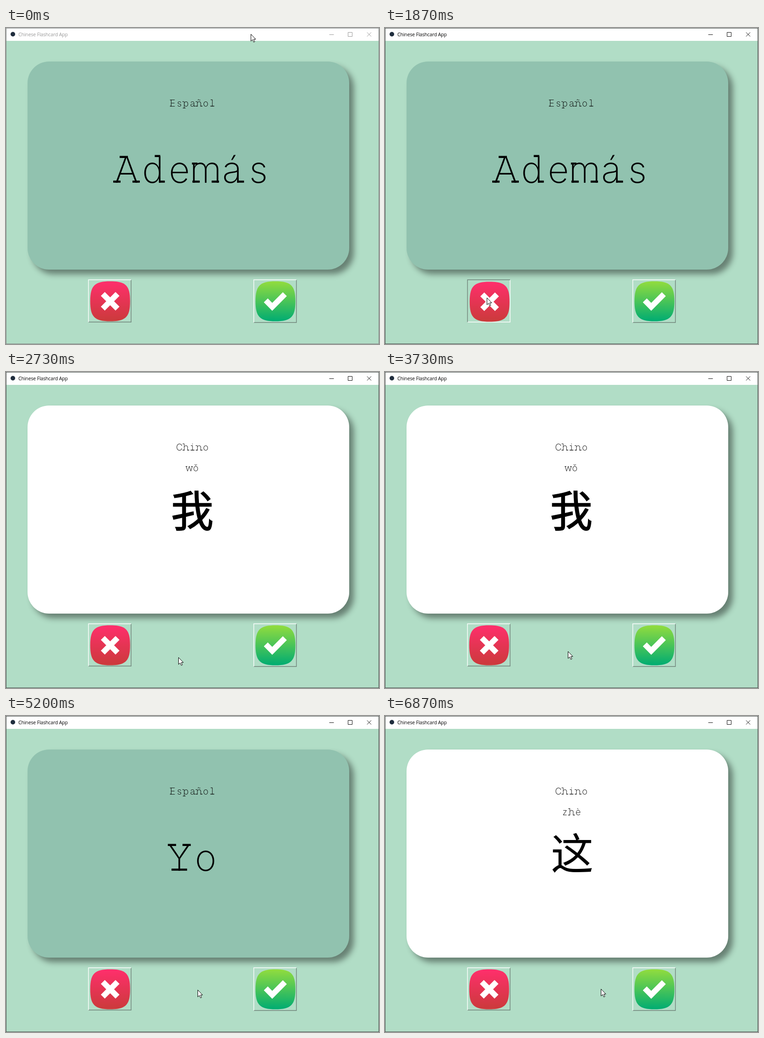
Animation, 814 px wide and 688 px high, one loop 8 s. Source, as an HTML page:

```html
<!DOCTYPE html>
<html lang="es">
<head>
<meta charset="utf-8">
<title>Chinese Flashcard App</title>
<style>
html, body { margin: 0; width: 100%; height: 100%; overflow: hidden; background: #b1ddc6; }
svg { position: absolute; left: 0; top: 0; display: block; }
#card {
  position: absolute; left: 47px; top: 73px; width: 702px; height: 453px;
  border-radius: 47px; box-shadow: 10px 10px 13px rgba(0, 0, 0, .42);
}
.title { font: 10.5px "Open Sans", "Noto Sans", sans-serif; letter-spacing: -.13px; }
.word text {
  font: 200 80px Inter, "Open Sans", sans-serif;
  font-optical-sizing: none; text-anchor: middle;
}
.word path { fill: none; stroke: #000; stroke-width: 4.4; }
.hanzi { font: 93px "Noto Sans CJK SC", "Noto Sans CJK", sans-serif; text-anchor: middle; }
.mark { fill: none; stroke: #fff; stroke-width: 12.2; }
</style>
</head>
<body>
<div id="card"></div>
<svg id="stage" width="814" height="688" viewBox="0 0 814 688">
  <defs>
    <linearGradient id="red" x2="0" y2="1"><stop stop-color="#ff2f6c"/><stop offset="1" stop-color="#cb3a3b"/></linearGradient>
    <linearGradient id="green" x2="0" y2="1"><stop stop-color="#92dc3e"/><stop offset="1" stop-color="#00ac72"/></linearGradient>
  </defs>
  <rect width="814" height="28" fill="#fff"/>
  <circle cx="15" cy="13.5" r="5" fill="#1f2d3d"/>
  <text id="title" class="title" x="27" y="18">Chinese Flashcard App</text>
  <path id="controls" fill="none" d="M705.5 14.5h10M746.5 9.5h9v9h-9zM788 9.5l9 9M797 9.5l-9 9"/>
  <rect id="frame" x=".5" y=".5" width="813" height="687" fill="none"/>
  <g id="faces"></g>
  <g id="buttons"></g>
  <path id="cursor" fill="#fff" stroke="#000" stroke-linejoin="round"
    d="M.5.5V15.6L4 12.4 6.5 17.8 8.9 16.7 6.5 11.4H11z"/>
</svg>
<script>
const LOOP = 8000;
const CELL = 57.6;
const $ = id => document.getElementById(id);

function add(parent, tag, attrs, text = '') {
  const el = document.createElementNS('http://www.w3.org/2000/svg', tag);
  for (const key in attrs) el.setAttribute(key, attrs[key]);
  el.textContent = text;
  return parent.appendChild(el);
}

// Slab serifs: letters sharing a bar, its height, its length, its centres in the cell.
const BASE = -2.2, MID = -41.6, CAP = -56, TALL = -58;
const slabs = [
  ['Ahmn', BASE, 16, [-21, 21]],
  ['ad', BASE, 12, [20]],
  ['Yil', BASE, 34, [0]],
  ['E', BASE, 12, [-18]],
  ['E', CAP, 12, [-18]],
  ['A', CAP, 18, [-6]],
  ['Y', CAP, 18, [-16, 16]],
  ['mnp', MID, 12, [-24]],
  ['w', MID, 14, [-23, 23]],
  ['i', MID, 14, [-7]],
  ['l', TALL, 14, [-7]],
  ['d', TALL, 12, [10]],
  ['h', TALL, 12, [-22]],
  ['p', 14, 24, [-15]]
];

function slabPath(ch) {
  const letter = ch.normalize('NFD')[0];
  return slabs.filter(([letters]) => letters.includes(letter))
    .flatMap(([, y, len, xs]) => xs.map(x => `M${x - len / 2} ${y}h${len}`)).join('');
}

function word(parent, text, y, scale) {
  const g = add(parent, 'g', { class: 'word', transform: `translate(407 ${y}) scale(${scale})` });
  const xs = [...text].map((_, i) => (i - (text.length - 1) / 2) * CELL);
  add(g, 'text', { x: xs.join(' ') }, text);
  [...text].forEach((ch, i) => add(g, 'path', { d: slabPath(ch), transform: `translate(${xs[i]})` }));
}

function spanish(text) {
  const g = add($('faces'), 'g', {});
  word(g, 'Español', 170.7, .25);
  word(g, text, 336.7, 1);
  return g;
}

function chinese(pinyin, hanzi, x, y, weight) {
  const g = add($('faces'), 'g', {});
  word(g, 'Chino', 170.7, .25);
  word(g, pinyin, 216.2, .25);
  add(g, 'text', { class: 'hanzi', lang: 'zh-Hans', x, y, stroke: '#000', 'stroke-width': weight }, hanzi);
  return g;
}

function button(x, h, fill, mark) {
  const g = add($('buttons'), 'g', { transform: `translate(${x} 548.2)`, fill: 'none', 'stroke-width': 1.4 });
  const low = add(g, 'path', { d: `M0 ${h}H93V0` });
  const high = add(g, 'path', { d: `M0 ${h}V0H93` });
  const icon = add(g, 'g', { stroke: 'none' });
  add(icon, 'path', {
    fill: `url(#${fill})`, transform: 'translate(47.3 46.8)',
    d: 'M-43.5 0C-43.5-34-34-43.5 0-43.5S43.5-34 43.5 0 34 43.5 0 43.5-43.5 34-43.5 0z'
  });
  add(icon, 'path', { class: 'mark', d: mark, transform: 'translate(47.3 46.8)' });
  return down => {
    high.setAttribute('stroke', down ? '#70837a' : '#fff');
    low.setAttribute('stroke', down ? '#fff' : '#70837a');
    icon.setAttribute('transform', down ? 'translate(1 1)' : '');
  };
}

const faces = [
  { from: 0, el: spanish('Además'), color: '#91c2af' },
  { from: 29, el: chinese('wǒ', '我', 406.5, 337, 1.5), color: '#fff' },
  { from: 59, el: spanish('Yo'), color: '#91c2af' },
  { from: 96, el: chinese('zhè', '这', 408.5, 333.5, 0), color: '#fff' }
];
const pressNo = button(180, 92, 'red', 'M-16-16 16 16M16-16-16 16');
const pressYes = button(540.7, 93, 'green', 'M-21-2-7 12 20.5-15.5');

// Pointer moves: first tick, last tick, destination. It rests in between.
const moves = [
  [3, 11, 816, 210], [11, 12, 840, 400], [12, 13, 798, 504], [13, 16, 526, 614],
  [18, 27, 222, 587], [30, 39, 391, 628], [39, 43, 371, 618], [45, 48, 373, 616],
  [53, 56, 399, 608], [75, 78, 418, 596], [87, 94, 609, 592], [96, 103, 471, 594]
];

function pointer(tick) {
  let x = 534, y = 13;
  for (const [from, to, x1, y1] of moves) {
    const k = Math.min(1, Math.max(0, (tick - from) / (to - from)));
    const eased = k * (2 - k);
    x += (x1 - x) * eased;
    y += (y1 - y) * eased;
  }
  return [Math.round(x), Math.round(y)];
}

// The screen refreshes three times every 200 ms.
function tickAt(ms) {
  const rest = ms % 200;
  return 3 * Math.floor(ms / 200) + (rest >= 70) + (rest >= 130);
}

function draw(ms) {
  const tick = tickAt(ms);
  const active = tick >= 1;
  $('title').setAttribute('fill', active ? '#000' : '#999');
  $('controls').setAttribute('stroke', active ? '#111' : '#999');
  $('frame').setAttribute('stroke', active ? '#4c5551' : '#858c89');

  const shown = faces.filter(f => f.from <= tick).pop();
  for (const f of faces) f.el.style.display = f === shown ? '' : 'none';
  $('card').style.background = shown.color;

  pressNo(tick >= 27 && tick < 29);
  pressYes(tick >= 94 && tick < 96);
  $('cursor').setAttribute('transform', `translate(${pointer(tick)})`);
}

const start = performance.now();
function loop() {
  draw((performance.now() - start) % LOOP);
  requestAnimationFrame(loop);
}
loop();
</script>
</body>
</html>
```
